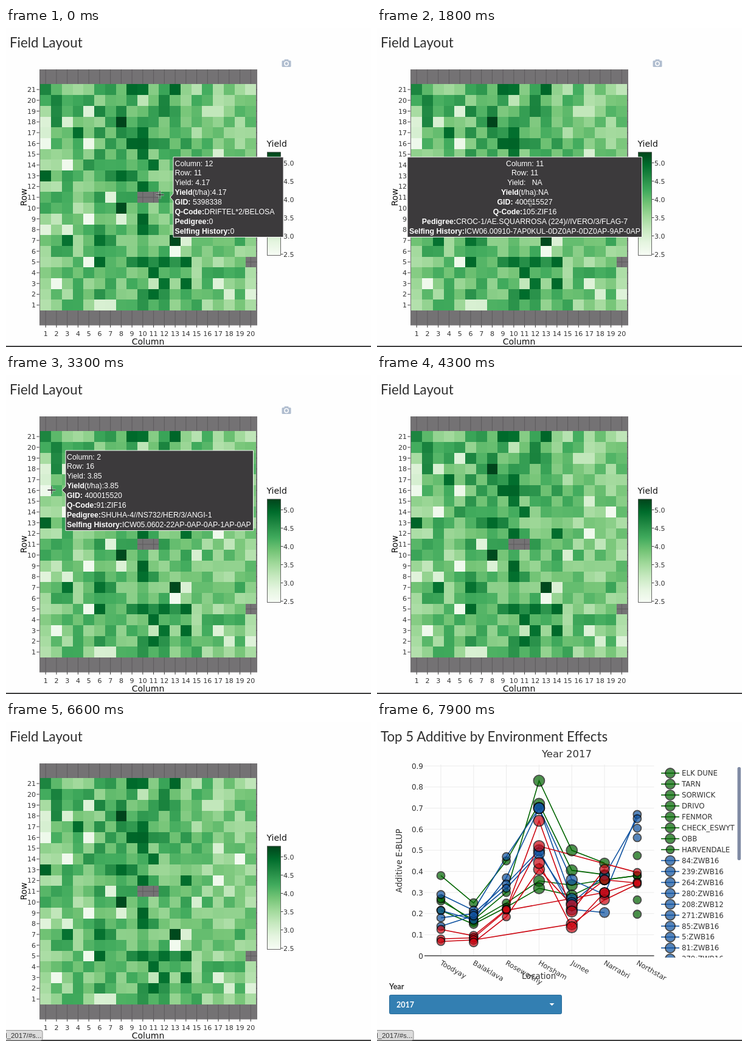
An HTML page that plays this animation: 600 px wide and 524 px high, repeating every 8 s.

```html
<!DOCTYPE html>
<html lang="en">
<head>
<meta charset="utf-8">
<title>Field Layout</title>
<style>
html, body { margin: 0; width: 100%; height: 100%; overflow: hidden; background: #fefefe; }
svg { display: block; width: 600px; height: 524px; }
text { font: 11px "DejaVu Sans", Verdana, sans-serif; fill: #333; white-space: pre; }
.h { font: 22.3px Lato, sans-serif; fill: #2f2f2f; }
.axis { font-size: 14px; fill: #111; }
.mid { text-anchor: middle; }
.end { text-anchor: end; }
.tip text { font: 12.3px "Liberation Sans", Arial, sans-serif; fill: #fff; }
.tip tspan { font-weight: bold; }
.lato { font: bold 12.5px Lato, sans-serif; }
</style>
</head>
<body>
<svg id="stage" viewBox="0 0 600 524"></svg>
<script>
const stage = document.getElementById('stage');

function add(parent, tag, attrs = {}, text) {
  const el = document.createElementNS('http://www.w3.org/2000/svg', tag);
  for (const k in attrs) el.setAttribute(k, attrs[k]);
  if (text !== undefined) el.textContent = text;
  parent.append(el);
  return el;
}
const group = (parent, attrs) => add(parent, 'g', attrs);
const rect = (p, x, y, width, height, fill, more) => add(p, 'rect', { x, y, width, height, fill, ...more });
const path = (p, d, stroke, more) => add(p, 'path', { d, stroke, fill: 'none', ...more });
const label = (p, x, y, text, cls = '', more) => add(p, 'text', { x, y, class: cls, ...more }, text);

// ---- Heat map ----
const field = group(stage);
const LOW = 2.475, HIGH = 5.3, STEP = 17.74, ROW = 17.7;
const greens = ['#f7fcf5', '#e5f5e0', '#c7e9c0', '#a1d99b', '#74c476', '#41ab5d', '#238b45', '#006d2c', '#00441b'];
const rgb = greens.map(c => [1, 3, 5].map(i => parseInt(c.slice(i, i + 2), 16)));
const colX = c => 65.2 + (c - 1) * STEP;
const rowY = r => 455.1 - (r - 1) * ROW;

function shade(v) {
  const k = Math.max(0, Math.min(7.999, (v - LOW) / (HIGH - LOW) * 8));
  const i = Math.floor(k), f = k - i;
  return `rgb(${rgb[i].map((a, j) => Math.round(a + (rgb[i + 1][j] - a) * f))})`;
}

// Plots that stand out, as row * 100 + column; the rest are random
const marked = new Map();
const mark = (value, ...ids) => ids.forEach(id => marked.set(id, value));
mark(2.6, 1601, 1605, 1403, 1419, 1217, 905, 613, 505, 302);
mark(2.95, 1801, 1701, 1905, 1803, 1517, 1107, 1015, 908, 801, 803, 714, 317, 218, 220, 106, 107);
mark(3.3, 2115, 2010, 1916, 1917, 1202, 1004, 902, 311);
mark(4.65, 2101, 2002, 1902, 1802, 1906, 1908, 2012, 1912, 1309);
mark(4.95, 2109, 2110, 2113, 1704, 1710, 1609, 1610, 1510, 1411, 1301, 1308, 1210, 1214, 910, 810,
  703, 706, 506, 510, 512, 514, 411, 312, 314, 211);
mark(5.25, 1808, 1008, 713);
const missing = [1110, 1111, 520];

let seed = 17;
const random = () => (seed = seed * 16807 % 2147483647) / 2147483647;

label(field, 6, 32, 'Field Layout', 'h');
rect(field, 55, 68, 358, 420.5, '#747274');
for (let c = 1; c <= 20; c++) {
  path(field, `M${colX(c)} 68V488`, '#5d5b5d');
  path(field, `M${colX(c)} 488v4`, '#333');
  label(field, colX(c), 506, c, 'mid');
}
for (let r = 1; r <= 21; r++) {
  path(field, `M55 ${rowY(r)}H413`, '#5d5b5d');
  path(field, `M50.5 ${rowY(r)}h4`, '#333');
  label(field, 49, rowY(r) + 4, r, 'end');
  for (let c = 1; c <= 20; c++) {
    const id = r * 100 + c, noise = random() - 0.5;
    if (missing.includes(id)) continue;
    const trend = 3.82 + 0.3 * Math.exp(-(((c - 9) / 6) ** 2)) - (c > 14 && r > 10 ? 0.12 : 0);
    const v = marked.has(id) ? marked.get(id) + noise * 0.15 : trend + noise;
    rect(field, colX(c) - STEP / 2, rowY(r) - ROW / 2, STEP + 0.15, ROW + 0.15, shade(v), { 'shape-rendering': 'crispEdges' });
  }
}
label(field, 233.5, 520, 'Column', 'axis mid');
label(field, 0, 0, 'Row', 'axis mid', { transform: 'translate(33.5 278) rotate(-90)' });

const ramp = add(add(field, 'defs'), 'linearGradient', { id: 'ramp', x1: 0, y1: 1, x2: 0, y2: 0 });
greens.forEach((c, i) => add(ramp, 'stop', { offset: i / 8, 'stop-color': c }));
label(field, 428.5, 195, 'Yield', 'axis');
rect(field, 429.5, 204, 22, 169.5, 'url(#ramp)', { stroke: '#444', 'stroke-width': 0.8 });
for (let i = 0; i < 6; i++) {
  const y = 371.5 - i * 30;
  path(field, `M452 ${y}h3.5`, '#444');
  label(field, 456, y + 4, (2.5 + i / 2).toFixed(1));
}

const camera = group(field, { fill: '#b0bdcf' });
rect(camera, 453.5, 53.5, 15, 10.5, '#b0bdcf', { rx: 1.5 });
rect(camera, 457.5, 51.5, 7, 4, '#b0bdcf', { rx: 1 });
add(camera, 'circle', { cx: 461, cy: 58.5, r: 3.2, stroke: '#fefefe', 'stroke-width': 1.5 });

// ---- Hover tips ----
function tip([x, y, w], notch, textX, lines) {
  const g = group(field, { class: 'tip' });
  const side = notch ? `V${notch[1] + 6}L${notch}L${x} ${notch[1] - 6}` : '';
  path(g, `M${x} ${y}h${w}v131.5h${-w}${side}Z`, '#f4f4f4', { fill: '#3c3a3c' });
  lines.forEach(([bold, plain, left], i) => {
    const centred = !notch && left === undefined;
    const t = add(g, 'text', { x: left ?? textX, y: y + 14.5 + i * 15.95, class: centred ? 'mid' : '' });
    add(t, 'tspan', {}, bold);
    t.append(plain);
  });
  return g;
}
const details = (col, row, value, gid, code, pedigree, history) => [
  ['', `Column: ${col}`], ['', `Row: ${row}`], ['', `Yield: ${value === 'NA' ? '  NA' : value}`],
  ['Yield', `(t/ha):${value}`], ['GID:', ` ${gid}`], ['Q-Code:', code],
  pedigree, ['Selfing History:', history]
];

const tips = [
  [0, 500, tip([275, 212, 181], [270, 278], 277.5,
    details(12, 11, '4.17', 5398338, 'DRIFTEL*2/BELOSA', ['Pedigree:', '0'], '0'))],
  [500, 2200, tip([50, 212, 385.5], null, 243,
    details(11, 11, 'NA', 400015527, '105:ZIF16', ['Pedigree:', 'CROC-1/AE.SQUARROSA (224)//IVERO/3/FLAG-7'],
      'ICW06.00910-7AP0KUL-0DZ0AP-0DZ0AP-9AP-0AP'))],
  [2200, 2950, tip([-100, 230, 800], null, 242.3,
    details(11, 10, '4.01', 7173782, '129:ZWB16',
      ['', 'KI/4/TOLVERRAN*4/NERIB/3/2*FRET2/MIRELO//FRET2/5/QTD518*2/MIRELO*2//FRET2', 17],
      'CMSS10B00851T-099TOPY-099M-099NJ-099NJ-3WGY-0B'))],
  [3100, 3700, tip([98, 124, 308.5], [92, 189], 100,
    details(2, 16, '3.85', 400015520, '91:ZIF16', ['Pedigree:', 'SHUHA-4//NS732/HER/3/ANGI-1'],
      'ICW05.0602-22AP-0AP-0AP-1AP-0AP'))]
];
const wideClip = add(add(field, 'defs'), 'clipPath', { id: 'wide' });
rect(wideClip, 20, 220, 477, 150);
tips[2][2].setAttribute('clip-path', 'url(#wide)');

const pointer = group(field);
for (const [color, width] of [['#fff', 3], ['#222', 1.3]])
  path(pointer, 'M-6.5 0H6.5M0-6.5V6.5', color, { 'stroke-width': width, opacity: width > 2 ? 0.75 : 1 });

// ---- Line chart ----
const chart = group(stage);
const GREEN = '#006400', BLUE = '#0f52a0', RED = '#cc0611';
const places = ['Toodyay', 'Balaklava', 'Roseworthy', 'Horsham', 'Junee', 'Narrabri', 'Northstar'];
const radii = [6.5, 7, 6.5, 9, 9, 8, 6.5];
const placeX = i => 105 + i * 53.8;
const valueY = v => 384 - v * 346.5;

label(chart, 6, 32, 'Top 5 Additive by Environment Effects', 'h');
label(chart, 312, 58, 'Year 2017', 'mid', { style: 'font-size:16.5px' });
places.forEach((name, i) => {
  path(chart, `M${placeX(i)} 70V384`, '#ebebeb');
  label(chart, 0, 0, name, '', { transform: `translate(${placeX(i) - 2} 398) rotate(30)`, style: 'font-size:11.5px' });
});
for (let i = 0; i < 10; i++) {
  const y = valueY(i / 10);
  path(chart, `M78 ${y}H455.5`, i ? '#ebebeb' : '#444', { 'stroke-width': i ? 1 : 1.5 });
  label(chart, 76, y + 4.5, i ? (i / 10).toFixed(1) : '0', 'end', { style: 'font-size:12px' });
}
label(chart, 0, 0, 'Additive E-BLUP', 'mid', { transform: 'translate(41 228) rotate(-90)', style: 'font-size:13.3px' });
label(chart, 266, 422, 'Location', 'mid', { style: 'font-size:13.3px' });

const lines = group(chart), dots = group(chart);

function marker(p, cx, cy, r, fill) {
  add(p, 'circle', { cx, cy, r, fill, stroke: '#000', 'stroke-width': 1.8, opacity: 0.7 });
}
// One value per place; gaps are bridged by the line
function trace(color, ...values) {
  const pts = [];
  values.forEach((v, i) => { if (v) pts.push([placeX(i), valueY(v), radii[i]]); });
  path(lines, 'M' + pts.map(p => p.slice(0, 2)).join('L'), color, { 'stroke-width': 1.6 });
  pts.forEach(([x, y, r]) => marker(dots, x, y, r, color));
}
const gap = n => Array(n).fill(null);
const single = (color, v) => trace(color, ...gap(6), v);

trace(GREEN, .38, .25, .45, .72, .405, .385);
trace(GREEN, .26, .17, .3, .83, .5, .44);
trace(GREEN, .27, .16, .25, .355, .335, .36, .38);
trace(GREEN, .215, .15, .23, .32, .285, .36, .38);
single(GREEN, .475);
single(GREEN, .265);
single(GREEN, .197);
trace(BLUE, .29, .215, .47, .7, .27);
trace(BLUE, .215, .17, .37, .7, .36, .29, .67);
trace(BLUE, .18, .2, .34, .5, .22, .205);
trace(BLUE, .14, .19, .32, .485, .25, .38, .65);
single(BLUE, .605);
single(BLUE, .56);
trace(RED, .125, .095, .22, .52, ...gap(2), .395);
trace(RED, .08, .085, .215, ...gap(2), .3, .35);
trace(RED, .068, .075, ...gap(2), .15, .265, .34);
trace(RED, null, .063, .185, .41, .24, .36, .345);
trace(RED, ...gap(2), .22, .64, .21, .41);
trace(RED, ...gap(3), .44, .135, .3);

const legendClip = add(add(chart, 'defs'), 'clipPath', { id: 'legend' });
rect(legendClip, 462, 70, 130, 317);
const legend = group(chart, { 'clip-path': 'url(#legend)' });
const checks = ['ELK DUNE', 'TARN', 'SORWICK', 'DRIVO', 'FENMOR', 'CHECK_ESWYT', 'OBB', 'HARVENDALE'];
const entries = ['84:ZWB16', '239:ZWB16', '264:ZWB16', '280:ZWB16', '208:ZWB12', '271:ZWB16', '85:ZWB16',
  '5:ZWB16', '81:ZWB16', '279:ZWB16'];
[...checks, ...entries].forEach((name, i) => {
  const y = 84 + i * 17.95, color = i < checks.length ? GREEN : BLUE;
  path(legend, `M467 ${y}h30`, color, { 'stroke-width': 1.6 });
  marker(legend, 482, y, i === 7 ? 6.5 : 8, color);
  label(legend, 501, y + 4.2, name, '', { style: 'font-size:11.7px' });
});
rect(chart, 592.5, 74, 5.5, 153, '#808ba4', { rx: 2.5 });

label(chart, 20, 439, 'Year', 'lato');
rect(chart, 20.5, 448.5, 283, 31, '#337fb2', { stroke: '#2a6c99', rx: 2 });
label(chart, 32, 469, '2017', 'lato', { style: 'fill:#fff' });
path(chart, 'M283.5 462h8l-4 4z', 'none', { fill: '#fff' });

// ---- Window edge and link status ----
rect(stage, 0, 521, 600, 1.5, '#d5d5d8');
rect(stage, 0, 522.5, 600, 1.5, '#111');
const status = group(stage);
rect(status, -6, 506.5, 66, 16.5, '#dcdcdc', { stroke: '#8e8e8e', rx: 3 });
label(status, -1, 518.5, 'l_2017/#s...', '', { style: 'font:11.5px "Liberation Sans",Arial,sans-serif' });

// ---- Timeline ----
const LOOP = 8000;
const route = [[0, 253, 274], [450, 253, 274], [750, 252, 287], [1900, 252, 287], [2300, 228, 291],
  [2800, 228, 291], [3150, 75, 189], [3550, 75, 189], [3800, 40, 205]];
const show = (el, on) => { el.style.display = on ? '' : 'none'; };
const ease = u => u * u * (3 - 2 * u);

function pointerAt(t) {
  const i = route.findIndex(k => k[0] > t);
  const [a, b] = [route[i - 1], route[i]];
  const u = ease((t - a[0]) / (b[0] - a[0]));
  return [1, 2].map(j => a[j] + (b[j] - a[j]) * u);
}

function draw(now) {
  const t = now % LOOP;
  show(field, t < 7000);
  show(chart, t >= 7000);
  show(status, t >= 4400);
  show(pointer, t < 3750);
  camera.style.opacity = Math.max(0, Math.min(1, (4050 - t) / 250));
  for (const [from, to, el] of tips) show(el, t >= from && t < to);
  if (t < 3750) pointer.setAttribute('transform', `translate(${pointerAt(t)})`);
  requestAnimationFrame(draw);
}
requestAnimationFrame(draw);
</script>
</body>
</html>
```
